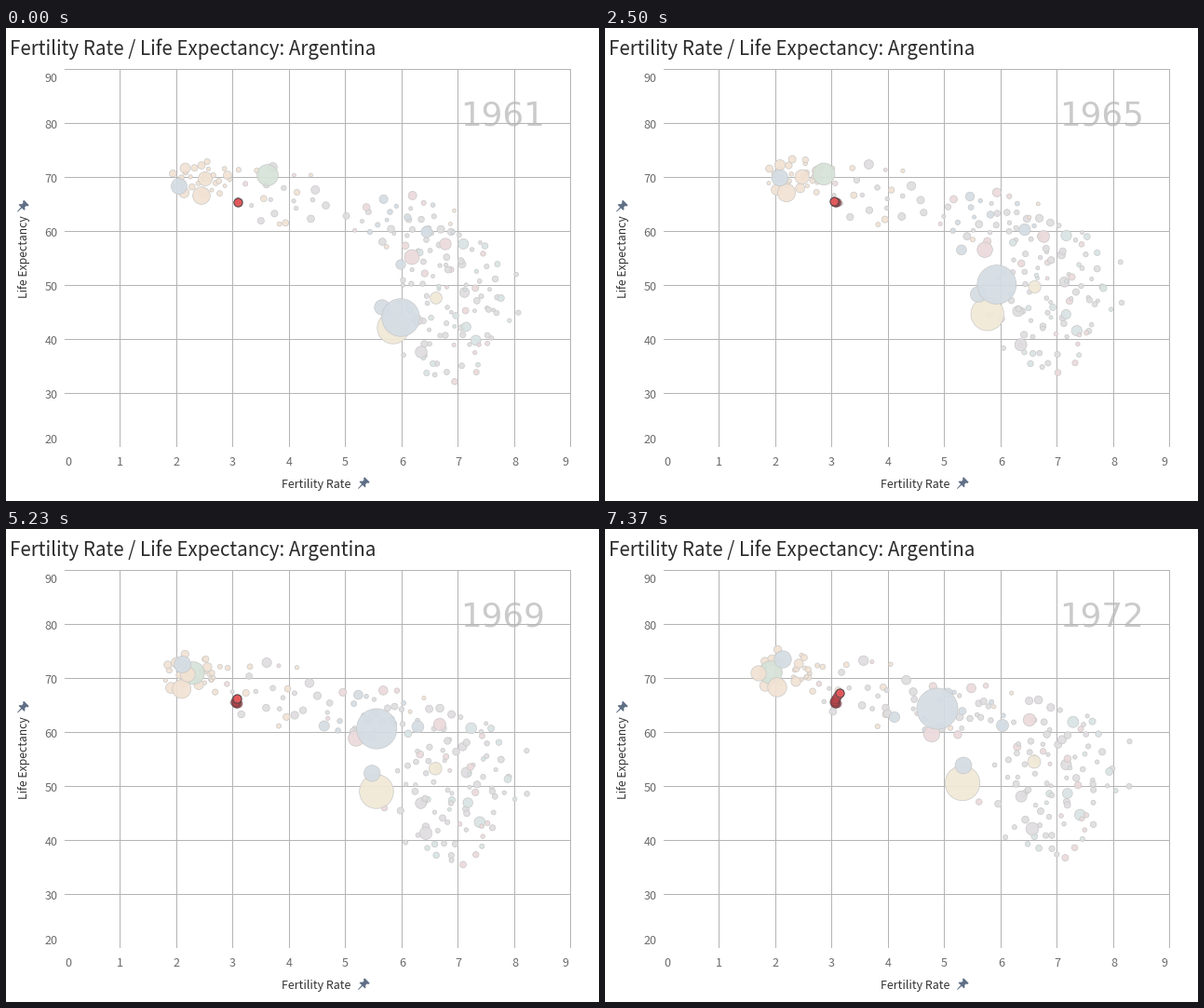
Animation of 637 by 508 pixels, one loop 8 s. Source, as a matplotlib script:

```python
import numpy as np
import matplotlib.pyplot as plt
from matplotlib.animation import FuncAnimation
from matplotlib.patches import Polygon

W, H, DPI = 637, 508, 100
INTERVAL, LOOP = 40, 8000
PX = 72 / DPI
YEAR_STARTS = [280, 990, 1790, 2500, 3200, 3840, 4520, 5230, 5980, 6710, 7370]
YEARS = len(YEAR_STARTS) + 1
U = np.linspace(0, 1, YEARS)
SANS = "Noto Sans CJK JP"

BLUE, ORANGE, CREAM = "#d4dde4", "#f2e2d3", "#f1e9d7"
PINK, GREY, GREEN, TEAL = "#ecdadb", "#dfdddf", "#d6e2d8", "#d9e3e3"

# Large countries: color, radius, start, end, delay of the fertility drop
COUNTRIES = [
    (GREEN, 11.4, (281, 158), (178, 154), 0.8),
    (GREY, 6.3, (446, 348), (459, 322), 3),
    (PINK, 8.0, (436, 246), (351, 220), 1.1),
    (PINK, 6.2, (472, 232), (456, 205), 3),
    (CREAM, 6.4, (462, 290), (461, 250), 1),
    (CREAM, 17.2, (416, 322), (384, 273), 1.8),
    (ORANGE, 9.4, (210, 180), (185, 170), 0.5),
    (ORANGE, 7.5, (214, 162), (165, 155), 3),
    (BLUE, 8.5, (186, 170), (191, 140), 1),
    (BLUE, 8.2, (404, 300), (385, 254), 1.8),
    (BLUE, 6.0, (452, 219), (427, 211), 3),
    (BLUE, 5.2, (424, 254), (311, 202), 1),
    (BLUE, 20.3, (424, 311), (357, 193), 3),
]
# Groups of small ones: count, center, half axes, drift per year, palette
CLOUDS = [
    (88, (474, 296), (55, 84), (0.4, -2.6), [GREY, GREY, GREY, PINK, TEAL]),
    (10, (528, 285), (28, 60), (0.4, -3.0), [GREY, GREY, TEAL]),
    (32, (425, 209), (56, 30), (-4.2, -1.3), [GREY, GREY, PINK, BLUE, ORANGE]),
    (22, (295, 182), (52, 36), (-1.6, -0.6), [GREY, GREY, ORANGE, PINK]),
    (28, (212, 161), (38, 18), (-1.2, -0.8), [ORANGE]),
]


def country_path(start, end, delay):
    """Life expectancy eases up while fertility shifts with a delay."""
    ease = np.c_[U ** delay, U * U * (3 - 2 * U)]
    return start + ease * np.subtract(end, start)


def cloud_paths(rng, count, center, axes, drift):
    """A loosened sunflower spread whose dots drift at slightly different paces."""
    i = np.arange(count)
    angle, reach = 2.39996 * i, np.sqrt((i + 0.5) / count)
    spread = np.c_[np.cos(angle), np.sin(angle)] * reach[:, None]
    start = center + (spread + rng.normal(0, 0.08, (count, 2))) * axes
    speed = rng.normal(drift, (0.7, 0.4), (count, 2))
    return start[:, None] + np.arange(YEARS)[:, None] * speed[:, None]


def build_bubbles():
    rng = np.random.default_rng(11)
    paths, radii, colors = [], [], []
    for count, center, axes, drift, palette in CLOUDS:
        paths.extend(cloud_paths(rng, count, center, axes, drift))
        radii.extend(np.minimum(1.9 + rng.exponential(1.0, count), 5.5))
        colors.extend(rng.choice(palette, count))
    for color, radius, start, end, delay in COUNTRIES:
        paths.append(country_path(start, end, delay))
        radii.append(radius)
        colors.append(color)
    return np.array(paths), np.array(radii), colors


def marker_area(radius):
    return (2 * radius * PX) ** 2


def grid_line(xs, ys):
    ax.plot(xs, ys, color="#b4b4b4", lw=PX, snap=False,
            solid_capstyle="butt", zorder=1)


def label(x, y, text, size, color="#333333", font=SANS, **kw):
    return ax.text(x, y, text, fontsize=size * PX, color=color, family=font, **kw)


def draw_pin(x, y):
    profile = np.array([(-8, .4), (-2, .7), (-2, 4.3), (-.5, 4), (.8, 2.3),
                        (3, 2.3), (3.8, 3.8), (5.6, 3.8)])
    along = np.r_[profile[:, 0], profile[::-1, 0]]
    across = np.r_[profile[:, 1], -profile[::-1, 1]]
    outline = np.c_[x + (along + across) * .71, y + (across - along) * .71]
    ax.add_patch(Polygon(outline, color="#5f6f86", lw=0))


fig = plt.figure(figsize=(W / DPI, H / DPI), dpi=DPI, facecolor="white")
ax = fig.add_axes([0, 0, 1, 1])
ax.set_xlim(0, W)
ax.set_ylim(H, 0)
ax.axis("off")

# Grid and tick labels; the outermost labels are pulled inside the plot
for value in range(10):
    x = round(62 + 60.44 * value) + 0.5
    if value:
        grid_line([x, x], [44, 450])
    label(np.clip(x, 67, 601), 470.5, str(value), 12.6, "#6b6b6b", ha="center")
for value in range(20, 91, 10):
    y = 566.5 - 5.8 * value
    if value > 20:
        grid_line([63, 607], [y, y])
    label(55.5, np.clip(y + 5, 57.5, 446), str(value), 12.6, "#6b6b6b", ha="right")

label(4, 29, "Fertility Rate / Life Expectancy: Argentina", 20.55, "#2b2b2b")
label(296, 494, "Fertility Rate", 12.5)
label(20, 246, "Life Expectancy", 12.2, rotation=90, ha="center", va="center")
draw_pin(18, 191.5)
draw_pin(384, 489)
year_text = label(488, 104.5, "1961", 35.7, "#cacaca", "DejaVu Sans", zorder=0.5)

paths, radii, colors = build_bubbles()
home = np.c_[249 + 3 * U - 16 * U * (1 - U), 187 - 11 * U ** 2.5]
bubbles = ax.scatter(*paths[:, 0].T, s=marker_area(radii), c=colors, alpha=0.93,
                     edgecolors="#c6c6c6", linewidths=0.5, zorder=2)
trail = ax.scatter([], [], s=marker_area(4.6), c="#d0484e", alpha=0.5,
                   edgecolors="#4a3a3e", linewidths=0.6, zorder=3)
current = ax.scatter(*home[0], s=marker_area(4.6), c="#e0595b",
                     edgecolors="#54464a", linewidths=0.8, zorder=4)


def update(frame):
    now = frame * INTERVAL + 30
    step = sum(now >= start for start in YEAR_STARTS)
    year_text.set_text(str(1961 + step))
    bubbles.set_offsets(paths[:, step])
    bubbles.set_sizes(marker_area(radii * (1 + 0.008 * step)))
    trail.set_offsets(home[:step])
    current.set_offsets(home[step:step + 1])
    return year_text, bubbles, trail, current


anim = FuncAnimation(fig, update, frames=LOOP // INTERVAL, interval=INTERVAL,
                     repeat=True, repeat_delay=0)
plt.show()
```
